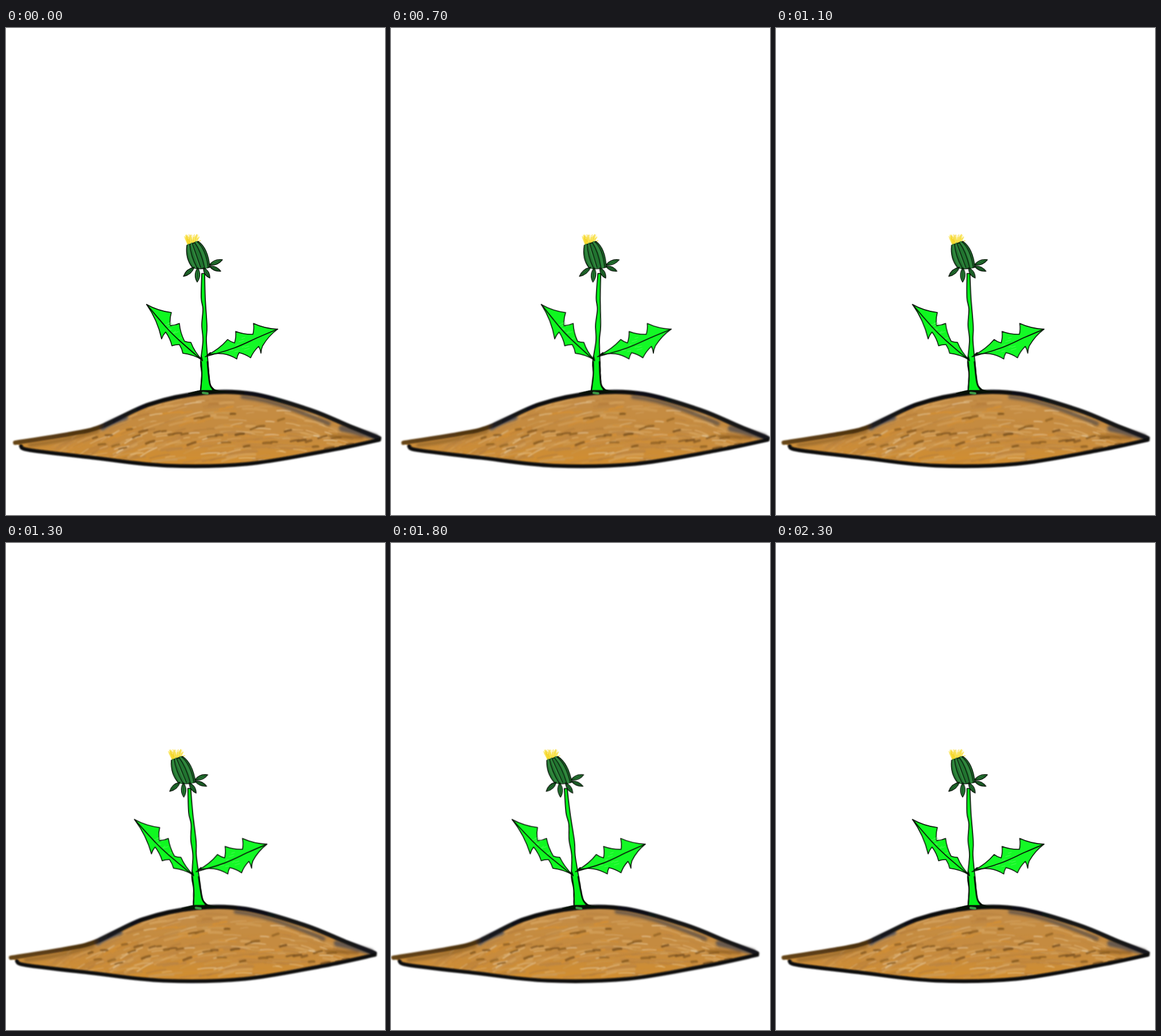
These frames come from a looping animation (660x849 px, 2400 ms). An HTML page:

```html
<!DOCTYPE html>
<html lang="en">
<head>
<meta charset="utf-8">
<title>Swaying dandelion</title>
<style>
  html, body { margin: 0; width: 100%; height: 100%; overflow: hidden; background: #fff; }
  svg { display: block; width: 660px; height: 849px; }
  path { stroke-linecap: round; stroke-linejoin: round; }
</style>
</head>
<body>
<svg viewBox="0 0 660 849" fill="none">
  <defs>
    <filter id="soft" x="-5%" y="-20%" width="110%" height="140%"><feGaussianBlur stdDeviation=".9"/></filter>
    <filter id="haze" x="-20%" y="-60%" width="140%" height="220%"><feGaussianBlur stdDeviation="2"/></filter>
    <linearGradient id="earth" x1="0" y1="0" x2="0" y2="1">
      <stop offset="0" stop-color="#c48d47"/>
      <stop offset=".6" stop-color="#c68b3e"/>
      <stop offset="1" stop-color="#d38f2f"/>
    </linearGradient>
    <linearGradient id="crest" gradientUnits="userSpaceOnUse" x1="14" y1="0" x2="652" y2="0">
      <stop offset="0" stop-color="#664515"/>
      <stop offset=".23" stop-color="#4a3010"/>
      <stop offset=".25" stop-color="#1c1c20"/>
      <stop offset=".4" stop-color="#090a0c"/>
      <stop offset="1" stop-color="#19191b"/>
    </linearGradient>
    <clipPath id="inside"><path id="clip"/></clipPath>
  </defs>
  <g id="scene">
    <path id="ground" fill="url(#earth)" filter="url(#soft)"/>
    <g clip-path="url(#inside)"><g id="grain" filter="url(#soft)"></g></g>
    <g id="shade" filter="url(#haze)"></g>
    <g id="rim" filter="url(#soft)"></g>
    <g id="plant"></g>
  </g>
</svg>
<script>
const NS = 'http://www.w3.org/2000/svg';
const INK = '#061006';
const $ = id => document.getElementById(id);

function add(layer, d, attrs) {
  const path = document.createElementNS(NS, 'path');
  path.setAttribute('d', d);
  for (const k in attrs) path.setAttribute(k, attrs[k]);
  $(layer).appendChild(path);
}

const pairs = s => s.split(' ').map(p => p.split(',').map(Number));
const mix = (a, b, f) => a.map((v, n) => v + (b[n] - v) * f);

// Smooth curve through the points of a "x,y x,y" string.
function curve(s, start = 'M') {
  const p = pairs(s);
  let d = start + p[0];
  for (let i = 0; i < p.length - 1; i++) {
    const a = p[i - 1] || p[i], b = p[i], c = p[i + 1], e = p[i + 2] || c;
    const c1 = b.map((v, n) => v + (c[n] - a[n]) / 6);
    const c2 = c.map((v, n) => v - (e[n] - b[n]) / 6);
    d += `C${c1} ${c2} ${c}`;
  }
  return d;
}

let seed = 7;
const rnd = () => (seed = seed * 16807 % 2147483647) / 2147483647;
const between = (a, b) => a + (b - a) * rnd();
const pick = list => list[Math.floor(rnd() * list.length)];

// Mound
const ridge = '16,723 110,708 165,695 250,656 345,636 430,638 530,666 600,695 650,715';
const belly = '650,718 560,737 420,760 280,763 150,749 42,736 26,729';
const hill = curve(ridge) + curve(belly, 'L') + 'Z';
$('ground').setAttribute('d', hill);
$('clip').setAttribute('d', hill);

function dash(x, y, len, deg, color, width, opacity) {
  const a = deg * Math.PI / 180, dx = Math.cos(a) * len / 2, dy = Math.sin(a) * len / 2;
  add('grain', `M${x - dx} ${y - dy}Q${x} ${y - len * .06} ${x + dx} ${y + dy}`,
    { stroke: color, 'stroke-width': width, opacity });
}

// Strokes climb on the left and fall on the upper right.
const skyline = x => 644 + (x - 365) ** 2 * .0011;
const slope = (x, y) => -24 + (x - 150) * .075 + (740 - y) * (x - 330) * .0006;

function scatter(count, colors, len, width, opacity, jitter) {
  for (let i = 0; i < count; i++) {
    const x = between(95, 600), y = between(skyline(x), 757);
    dash(x, y, between(...len), slope(x, y) + between(-jitter, jitter),
      pick(colors), between(...width), between(...opacity));
  }
}
scatter(240, ['#bb8443', '#cb9a55', '#d48f33', '#b67e3b', '#d7a560', '#c88c40'], [16, 50], [2, 5], [.4, .8], 10);
scatter(75, ['#ebcb98', '#e4ba7c', '#f0dcb6'], [10, 34], [.9, 2], [.4, .85], 12);

// Short dark flecks spread evenly over the middle
for (let x = 155; x < 600; x += 12)
  dash(x, between(skyline(x) + 20, 733), between(7, 16), between(-24, 0),
    pick(['#85581d', '#8f6022', '#7d5320']), between(3.2, 4.6), between(.7, .9));

function shade(d, stroke, width, opacity) {
  add('shade', d, { stroke, 'stroke-width': width, opacity });
}
shade('M168 697Q184 686 208 679', '#555358', 9, 1);
shade('M412 643Q455 648 500 665T562 690', '#5b5048', 7, .8);
shade('M585 698Q615 704 643 713', '#55514f', 11, .85);
shade('M565 712L620 714', '#84551c', 5, .7);
shade('M42 727Q100 721 160 703', '#96682c', 7, .8);

add('rim', curve(ridge), { stroke: 'url(#crest)', 'stroke-width': 7.5 });
add('rim', curve(belly), { stroke: '#0d0e10', 'stroke-width': 6.5 });

// Plant
const shape = (d, fill, width = 1.5) =>
  add('plant', d, { fill, stroke: INK, 'stroke-width': width });
const line = (d, width = 1.4, stroke = INK) =>
  add('plant', d, { stroke, 'stroke-width': width });

// Toothed outline whose edges all sag slightly inwards.
function leaf(corners, rib, fill) {
  const p = pairs(corners);
  let d = 'M' + p[0];
  p.forEach((a, i) => {
    const b = p[(i + 1) % p.length], [mx, my] = mix(a, b, .5);
    d += `Q${mx - (b[1] - a[1]) * .1} ${my + (b[0] - a[0]) * .1} ${b}`;
  });
  shape(d + 'Z', fill);
  for (let i = 0; i < 9; i++) {
    const [x, y] = mix(pairs(rib)[1], pick(p), between(.1, .55));
    line(`M${x} ${y}l${between(4, 9)} ${between(-4, 0)}`, .8, '#5cf862');
  }
  line(curve(rib), 1.7);
}

function petal(base, tip, width, fill) {
  const [mx, my] = mix(base, tip, .5);
  const dx = tip[0] - base[0], dy = tip[1] - base[1], k = width / Math.hypot(dx, dy);
  shape(`M${base}Q${mx - dy * k} ${my + dx * k} ${tip}Q${mx + dy * k} ${my - dx * k} ${base}Z`, fill, 1.3);
  line(`M${base}L${mix(base, tip, .8)}`, .7);
}

shape('M318 637Q335 632 342 631L360 629Q365 632 382 634Q350 639 318 637Z', INK, 1);
shape(curve('339,632 341,603 339,583 343,545 341,518 343,490 340,470 341,428') +
  curve('346,428 347,470 350,520 349,545 352,585 355,620 361,632', 'L') + 'Z', '#04f31a', 1.7);
line(curve('351,582 353,605 356,623 365,633'), 2.8);
line(curve('340,582 341,605 339,631'), 2.2);
line('M343 636L351 637', 4, '#3c9a45');

leaf('245,482 288,496 286,519 302,515 311,546 322,548 341,578 308,567 302,552 289,554 278,530 271,542',
  '245,482 280,523 300,543 341,579', '#0ff820');
leaf('351,570 386,543 398,549 400,529 430,534 431,515 473,525 447,554 444,567 440,555 426,575 406,566 402,577 378,568',
  '347,573 397,558 440,539 473,525', '#14f926');
line('M340 572L342 580M350 571L356 566', 2);

// Yellow tuft fanning out of the bud
for (let i = 0; i < 60; i++) {
  const f = rnd(), x = 316 + f * 16;
  line(`M${x} ${379 - f * 5}L${x + (f - .5) * 9 + between(-3, 3)} ${between(360, 371)}`,
    between(.8, 1.7), pick(['#f8df35', '#fae65c', '#f5d324', '#fbe98a']));
}

// Bud: every rib is a blend of its left and right sides.
const GREEN = '#217430';
petal([354, 413], [377, 404], 7, '#267f35');
petal([354, 415], [374, 424], 6, GREEN);
const left = [315, 379, 312, 402, 325, 418], right = [335, 372, 352, 384, 355, 417];
const rib = f => {
  const [a, b, c, d, e, g] = mix(left, right, f);
  return `M${a} ${b}Q${c} ${d} ${e} ${g}`;
};
shape(rib(0) + 'Q340 422 355 417Q352 384 335 372Q326 375 315 379Z', GREEN, 1.4);
for (const f of [.15, .42, .8]) line(rib(f), 3.6, '#31873e');
for (let f = .25; f < 1; f += .22) line(rib(f), 1.2);
petal([328, 417], [309, 433], 7, GREEN);
petal([334, 418], [333, 443], 8, '#267f35');
petal([344, 418], [355, 436], 7, GREEN);

// The whole picture shears from its lower edge, one pose per 100 ms.
const STEP = 100, STEPS = 24, PEAK = 5, FOOT = 849;
const MEAN = -.0198, SWING = .0758;

let shown = -1;
const begin = performance.now();
function draw() {
  const step = Math.floor((performance.now() - begin) / STEP) % STEPS;
  if (step !== shown) {
    const lean = MEAN + SWING * Math.cos((step - PEAK) / STEPS * 2 * Math.PI);
    $('scene').setAttribute('transform', `matrix(1 0 ${-lean} 1 ${FOOT * lean} 0)`);
    shown = step;
  }
  requestAnimationFrame(draw);
}
draw();
</script>
</body>
</html>
```
